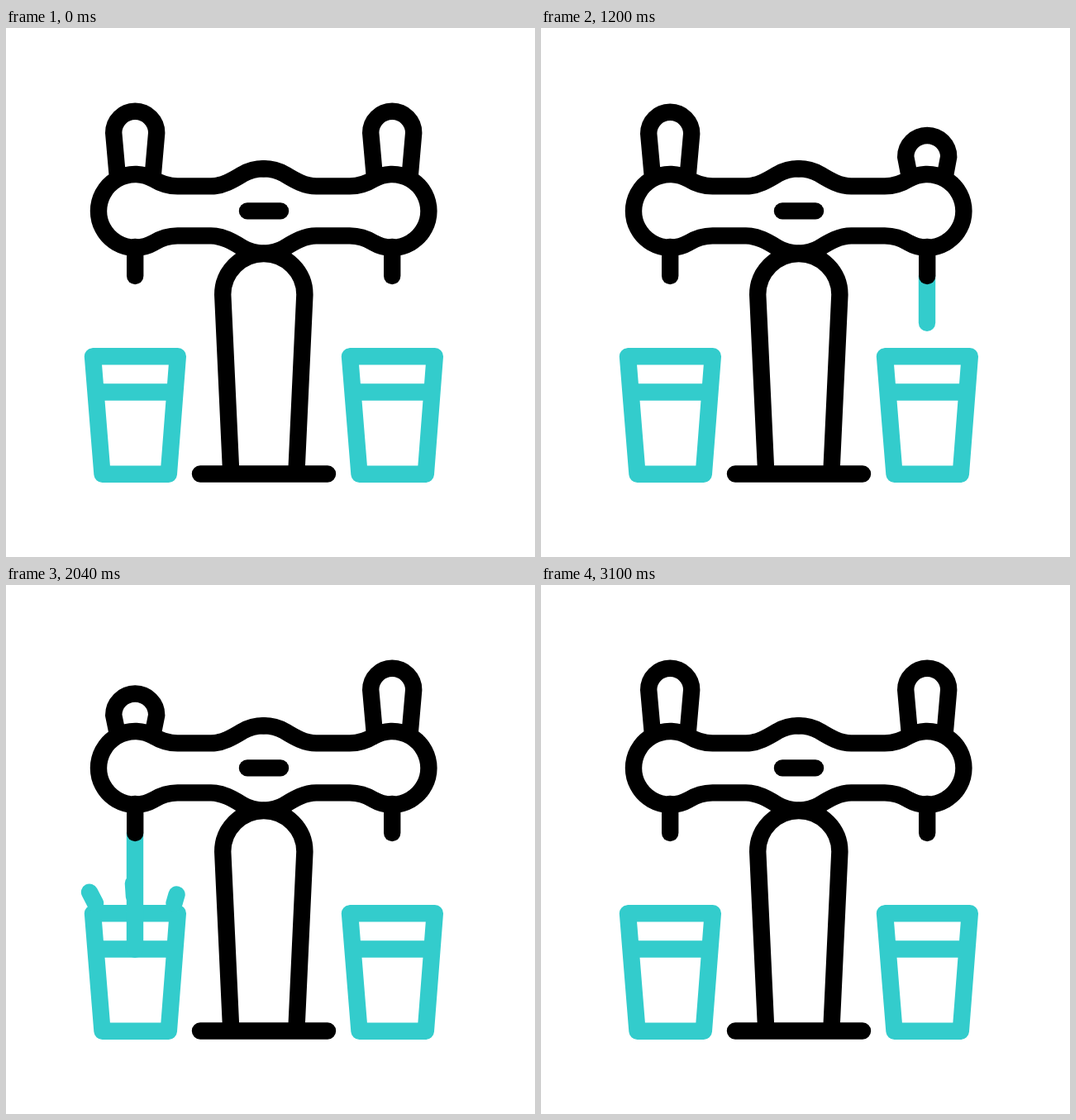
Animation of 640 by 640 pixels, one loop 3540 ms. Source, as an HTML page:

```html
<!DOCTYPE html>
<html lang="en">
<head>
<meta charset="utf-8">
<title>Beer tap</title>
<style>
  html, body { margin: 0; width: 100%; height: 100%; overflow: hidden; background: #fff; }
  svg {
    display: block; width: 100vw; height: 100vh; fill: none; stroke: #000;
    stroke-width: 20.4; stroke-linecap: round; stroke-linejoin: round;
  }
  .teal { stroke: #3cc; }
</style>
</head>
<body>
<svg viewBox="0 0 640 640">
  <defs>
    <path id="glass" d="M105 397.3H207.8L196.8 539.8H116.5ZM110 440.5H203"/>
    <path id="spout" d="M156.2 265V300"/>
    <path id="half" d="M311.7 170.2A51.200 51.200 0 0 0 286 177C274.500 184 262 191.400 248 191.400H207.500C197 191.400 187 188.200 178.500 182.900A44.400 44.400 0 1 0 178.500 259.900C187 254.600 197 251.400 207.500 251.400H248C262 251.400 274.500 258.800 286 265.800A51.200 51.200 0 0 0 311.700 272.600"/>
  </defs>
  <g class="teal">
    <use href="#glass"/>
    <use href="#glass" x="311"/>
    <path id="water0"/>
    <path id="water1"/>
  </g>
  <path id="handle0"/>
  <path id="handle1" transform="translate(311)"/>
  <use href="#spout"/>
  <use href="#spout" x="311"/>
  <use href="#half"/>
  <use href="#half" transform="matrix(-1 0 0 1 623.400 0)"/>
  <path d="M292 221.400H332"/>
  <path d="M272.300 539.500L262.200 322.500A49.600 49.600 0 0 1 361.400 322.500L351.300 539.500M235 539.500H389"/>
</svg>
<script>
const LOOP = 3540, PULL = 260, RELEASE = 400, DRAIN = 400, RISE = 180, FADE = 175;
const TOP = 300, LEVEL = 441, TRAVEL = 34;

// Times in ms for each pour; hit is when the stream reaches the glass.
const pours = [
  { side: 0, pull: 200, release: 845, open: 205, hit: 540, close: 635 },
  { side: 1, pull: 1005, release: 1502, open: 1040, hit: 1440, close: 1483 },
  { side: 0, pull: 1526, release: 1960, open: 1577, hit: 1977, close: 2203 },
  { side: 1, pull: 2252, release: 2700, open: 2308, hit: 2708, close: 2700 }
];

// Splash streaks: start x, y, end x, y
const streaks = [[108, 385, 88.500, 347.500], [155, 377, 152, 332], [203.500, 385, 212, 355.500]];

const el = id => document.getElementById(id);
const progress = (t, from, span) => Math.min(1, Math.max(0, (t - from) / span));
const ease = p => (1 - Math.cos(Math.PI * p)) / 2;
const mix = (a, b, p) => a + (b - a) * p;

function streak([x1, y1, x2, y2], from, to, dx) {
  const point = p => `${mix(x1, x2, p) + dx} ${mix(y1, y2, p)}`;
  return `M${point(from)}L${point(to)}`;
}

function water(t, { side, open, hit, close }) {
  const dx = side * 311;
  let d = "";
  if (t > open && t < close + DRAIN) {
    const head = progress(t, open, hit - open), tail = progress(t, close, DRAIN);
    d += streak([156, TOP, 156, LEVEL], tail, head, dx);
  }
  if (t > hit && t < hit + RISE + FADE) {
    const tip = progress(t, hit, RISE), end = progress(t, hit + RISE, FADE);
    d += streaks.map(s => streak(s, end, tip, dx)).join("");
  }
  return d;
}

function handle(drop) {
  const y = 126.800 + drop;
  return `M135 181L130.200 ${y}A26 26 0 0 1 182.200 ${y}L177.500 181`;
}

function draw(now) {
  const t = now % LOOP;
  for (const side of [0, 1]) {
    const own = pours.filter(p => p.side === side);
    const drop = own.reduce((sum, p) =>
      sum + ease(progress(t, p.pull, PULL)) - ease(progress(t, p.release, RELEASE)), 0);
    el("handle" + side).setAttribute("d", handle(drop * TRAVEL));
    el("water" + side).setAttribute("d", own.map(p => water(t, p)).join(""));
  }
}

const start = performance.now();
function tick() {
  draw(performance.now() - start);
  requestAnimationFrame(tick);
}
tick();
</script>
</body>
</html>
```
